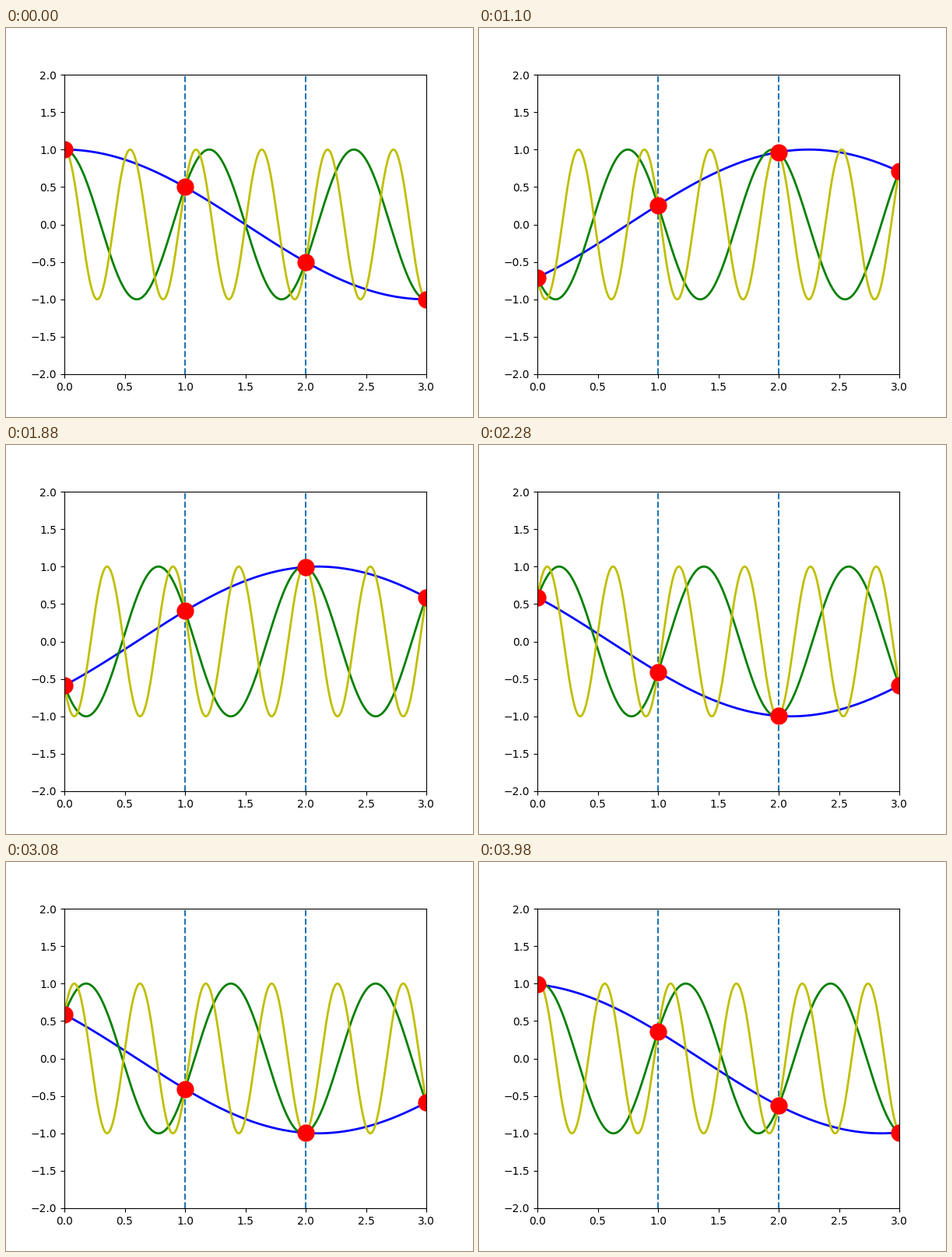
Recreate the animation shown at these times as a matplotlib script. Size 600 by 500 pixels, loop 4000 ms.

```python
import numpy as np
import matplotlib.pyplot as plt
from matplotlib.animation import FuncAnimation

FRAMES = 200
INTERVAL = 20
PERIOD = 40  # frames per oscillation

# Wave numbers that differ by 2*pi agree at every integer position.
BASE_K = np.pi / 3
waves = [BASE_K - 2 * np.pi * m for m in range(3)]

fig, ax = plt.subplots(figsize=(6, 5), dpi=100)
ax.set_xlim(0, 3)
ax.set_ylim(-2, 2)

x = np.linspace(0, 3, 1000)
sites = np.arange(4)

for pos in (1, 2):
    ax.axvline(pos, linestyle="--")
curves = [ax.plot([], [], color=c, lw=2)[0] for c in "bgy"]
atoms, = ax.plot([], [], "ro", markersize=15)


def update(frame):
    phase = 2 * np.pi * frame / PERIOD
    for curve, k in zip(curves, waves):
        curve.set_data(x, np.cos(k * x - phase))
    atoms.set_data(sites, np.cos(BASE_K * sites - phase))
    return [*curves, atoms]


anim = FuncAnimation(fig, update, frames=FRAMES, interval=INTERVAL,
                     repeat=True, repeat_delay=0)
plt.show()
```
